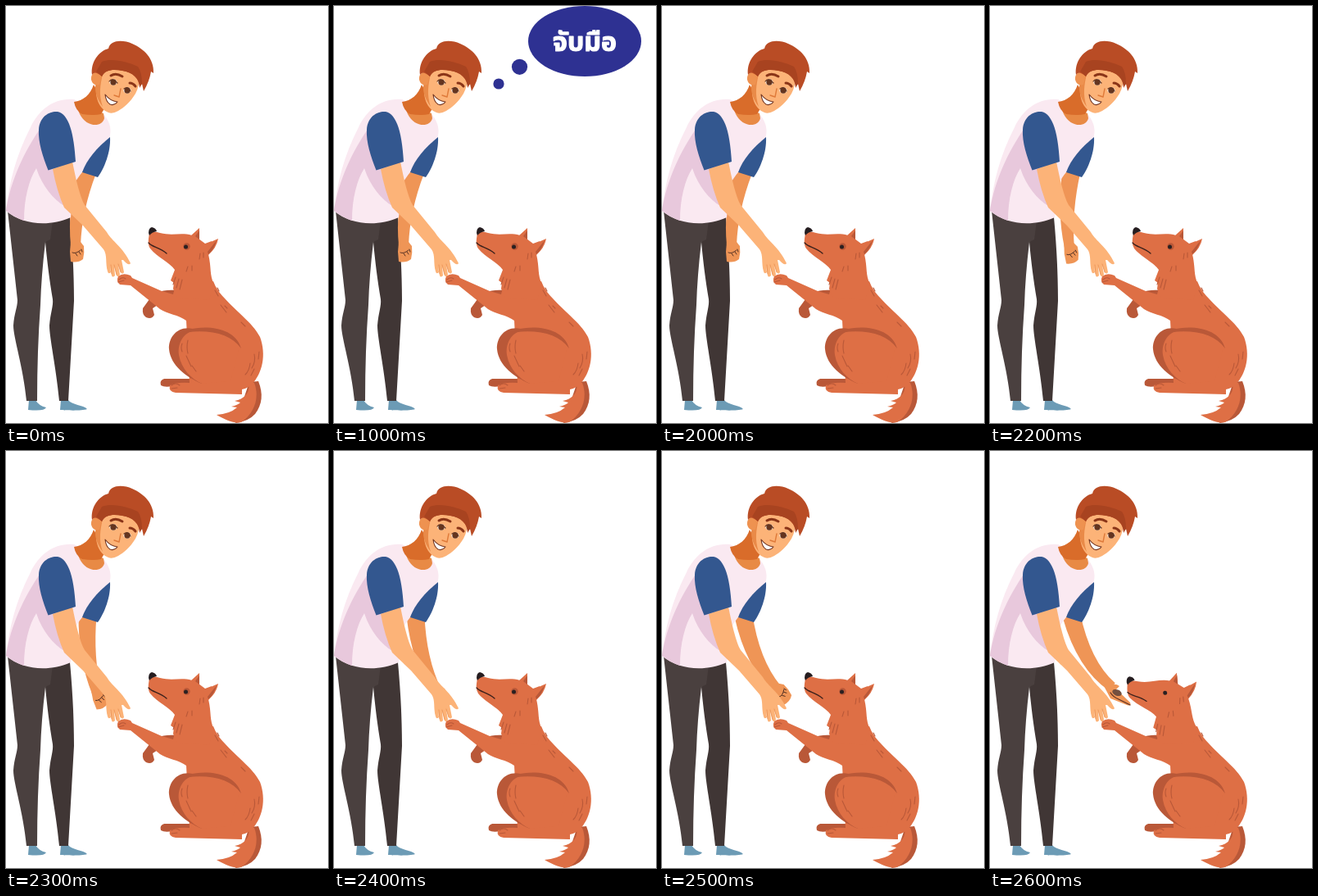
Animation of 393 by 509 pixels, one loop 4.6 s. Source, as an HTML page:

```html
<!DOCTYPE html>
<html lang="th">
<head>
<meta charset="utf-8">
<style>
html, body { margin: 0; width: 100%; height: 100%; overflow: hidden; background: #fff; }
svg { display: block; width: 100%; height: 100%; }
.line { fill: none; stroke-linecap: round; stroke-linejoin: round; }
.fur { fill: none; stroke: #b95838; stroke-width: 1.1; stroke-linecap: round; }
text { font: 700 32px "Noto Sans Thai Looped", "Noto Sans Thai", "Noto Sans", sans-serif; }
</style>
</head>
<body>
<svg viewBox="0 0 393 509">
  <g id="bubble" fill="#2e3192">
    <ellipse cx="306" cy="43" rx="69" ry="43"/>
    <circle cx="226.500" cy="74.300" r="9.600"/>
    <circle cx="201" cy="95" r="6.600"/>
    <text x="306" y="55" text-anchor="middle" fill="#fff" stroke="#fff" stroke-width="1.200" stroke-linejoin="round">จับมือ</text>
  </g>

  <g id="legs">
    <path fill="#6c9bb5" d="M28 481H36Q40 488 49 490Q47 495 27 493ZM67 481H76C80 487 95 487 99 492C92 494.500 72 493.500 66 493Z"/>
    <path fill="#403635" d="M54 262L78 258C81 290 83 325 83 360L76 482H65C61 440 53 405 53 390C54 375 58 366 57 358C53 335 50 310 48 288Z"/>
    <path fill="#4a403f" d="M2 250L57 262L54 285L48 288Q43 330 42 365Q38 420 38 482H25C21 440 9 405 9 390C10 375 14 368 14 359Z"/>
  </g>

  <path id="farArm" fill="#ef9556"/>
  <g id="fist">
    <path fill="#ef9556" d="M-6 -4H6L10 1Q11 9 9 17Q3 22 -6 20L-7 8Z"/>
    <path class="line" stroke="#4a2a20" stroke-width=".9" d="M-4 9Q0 11 6 6M0 10L2 13M4 8L6 11M7 5L8 8"/>
  </g>
  <g id="palm">
    <path fill="#ef9556" d="M138 285L147 286Q153 283 158 287L154 291Q163 299 171 307Q173 312 167 310L147 302Z"/>
    <path class="line" stroke="#5a3022" stroke-width="1.200" d="M147 295Q150 300 157 303L171 310"/>
    <ellipse cx="155" cy="295" rx="6" ry="3.700" transform="rotate(22 155 295)" fill="#74503f"/>
  </g>

  <g id="torso">
    <path fill="#fae9f1" d="M83 114C58 112 40 127 30 148C12 183 4 215 0 250C20 267 52 270 79 258L83 218C94 196 126 172 127 158C129 147 125 140 120 133Z"/>
    <path fill="#e8c8dc" d="M40 152C16 188 4 222 0 250Q10 258 22 262C22 235 28 212 37 198C44 220 58 236 71 244L66 195Z"/>
    <path fill="#e88a45" d="M84 117L119 131L120 137C117 149 98 148 90 132Z"/>
    <path fill="#d96c2a" d="M107 96C103 108 94 116 83 117Q85 128 93 132Q107 134 116 132L122 122Z"/>
    <path fill="#33578f" d="M127 160C128 178 120 198 112 209L93 203C98 188 111 173 127 160Z"/>
    <path fill="#fcb378" d="M57 199L81 190C85 210 90 233 96 243L123 276C130 288 142 293 152 314Q150 318 143 310L141 310L144 325Q142 328 140 325L137 316L139 328Q137 332 135 329L132 317L133 329Q130 332 129 329L127 316L128 325Q125 328 124 324C121 314 124 304 119 297L94 268L71 246Q62 226 57 199Z"/>
    <path class="line" stroke="#e78f52" stroke-width=".8" d="M128 316L129 327M132 316L135 328M137 315L140 325"/>
    <path fill="#33578f" d="M40 151C41 134 54 128 63 129C77 132 83 156 85 190L51.500 200.500C45 184 39 166 40 151Z"/>
  </g>

  <g id="head">
    <path fill="#fcb378" d="M113 76Q140 66 163 86Q163 98 158 107C152 117 144 124 137 128Q130 132 125 130C114 126 107 111 111 92Z"/>
    <path fill="#e98a48" d="M113 76L118 83C115 96 113 108 118 123Q106 107 110 92Z"/>
    <path fill="#ee9250" d="M117 84C110 77 103 82 104 90Q106 98 114 96Z"/>
    <path fill="#b94c25" d="M105 84C103 69 113 55 125 52C127 41 143 41 154 46C168 52 181 64 180 82L177 80Q175 92 168 104L166 95L163 100C163 89 155 81 142 79C130 77 121 78 117 86Q108 78 105 84Z"/>
    <path fill="#a84320" d="M117 68C130 63 150 69 161 74Q166 81 166 95L163 98C162 88 155 81 142 79C130 77 121 78 117 86Q111 80 110 80Z"/>
    <path class="line" stroke="#8a3518" stroke-width="3" d="M128 85Q134 81 142 86M151 94Q155 94 158 98"/>
    <g fill="#fff"><ellipse cx="131" cy="93" rx="4.600" ry="3.700"/><ellipse cx="148" cy="103" rx="4.600" ry="3.700"/></g>
    <g fill="#65351f"><circle cx="131" cy="93" r="3.700"/><circle cx="148" cy="103" r="3.700"/></g>
    <path class="line" stroke="#65351f" stroke-width="1.200" d="M126 92Q130 87 136 94M144 101Q149 97 152 104"/>
    <path class="line" stroke="#df7a3a" stroke-width="1.400" d="M140 101L138 111L132 109"/>
    <path fill="#fff" stroke="#743520" stroke-width="1.100" stroke-linejoin="round" d="M121 108Q127 116 136 117Q132 122 127 120Q122 117 121 108Z"/>
  </g>

  <g id="dog" fill="#de6f45">
    <path fill="#b95838" d="M207 347C191 346 181 349 175 358L167 369Q166 377 171 380Q178 383 181 377L179 369L188 363L211 356ZM240 455H193Q187 457 189 463Q193 466 204 464L242 463Z"/>
    <path fill="#b95838" d="M297 459L308 458C314 473 313 486 304 498Q296 507 280 509Z"/>
    <path d="M296 460L303 460C310 478 303 498 287 508C276 510 266 504 257 499Q273 498 282 490L275 489Q283 487 286 484L279 482C293 479 298 470 296 460Z"/>
    <path d="M207 340L253 336Q255 342 260 349C280 373 301 386 310 404C318 426 313 448 300 462Q296 466 288 468V474L207 472Q198 471 200 463Q207 459 224 460L220 384C211 377 197 376 188 370L152 341L139 340Q134 336 137 330Q143 325 152 329L154 332L190 348L204 352Z"/>
    <path fill="#b95838" d="M228 394C209 390 198 405 199 419C201 439 220 453 239 461L250 453L222 418Z"/>
    <path d="M234 396C218 396 209 410 211 426C214 443 226 455 239 461L274 458L285 416Q256 392 234 396Z"/>
    <path fill="#b95838" d="M222 395C247 389 280 393 287 418C275 401 252 395 222 398Z"/>
    <path class="fur" d="M138 334Q142 330 146 333M137 337L144 335M202 463Q207 459 212 463M202 467L209 466M255 347L259 354M258 344L260 348M262 365L269 374M267 366L270 369M287 386L292 391M215 412Q213 417 215 422M222 408Q220 416 222 424M220 427L226 440M227 439L232 446M303 425Q305 434 300 442M309 422L308 431M298 436Q297 445 292 450M303 443L299 451"/>
    <g id="dogHead">
      <path d="M175 277Q180 274 188 277C203 281 214 276 227 280L235 273L235 284L243 290L251 287Q249 298 247 303C251 320 248 328 254 340L248 359L208 356L204 345L205 338L201 335L206 322C200 313 185 307 176 296Q173 292 174 284Z"/>
      <path d="M226 280L236 271L236 285ZM243 291L259 284Q257 295 247 304Z"/>
      <path fill="#b95838" d="M231 281L236 274L236 285ZM246 300L257 286Q254 297 247 303Z"/>
      <path fill="#251d20" d="M174 277Q174 271 178 270Q183 271 184 275Q178 276 175 280Z"/>
      <path class="line" stroke="#3b211c" stroke-width="1.300" d="M174 289C179 295 187 294 196 302"/>
      <circle id="eyeRing" cx="220.500" cy="293.500" r="4.200" fill="#b95838"/>
      <circle cx="219.500" cy="294" r="2.500" fill="#2a2021"/>
      <path class="fur" d="M222 318L220 324M227 317L227 323M237 302L236 309M241 301L241 307M211 333L208 344M215 334L212 346M207 331L204 340"/>
    </g>
  </g>
</svg>
<script>
const LOOP = 4600;
const $ = id => document.getElementById(id);
const show = (id, on) => $(id).style.display = on ? "" : "none";

// Tapered outline through shoulder, elbow and wrist.
function limb(points, halfWidths, normals) {
  const side = sign => points.map(([x, y], i) =>
    [x + sign * halfWidths[i] * Math.cos(normals[i]), y - sign * halfWidths[i] * Math.sin(normals[i])]);
  const bend = ([from, mid, to]) => mid.map((v, i) => v * 1.2 - (from[i] + to[i]) * .1);
  const right = side(1), left = side(-1).reverse();
  return `M${right[0]}Q${bend(right)} ${right[2]}L${left[0]}Q${bend(left)} ${left[2]}Z`;
}

function draw(t) {
  show("bubble", t >= 1000 && t < 2000);

  const step = Math.max(0, Math.min(5, Math.floor((t - 2100) / 100)));
  const feeding = step === 5;
  const reach = feeding ? 1.15 : step / 4;
  const angle = 40 * reach ** 1.3;
  const rad = angle * Math.PI / 180;
  const shoulder = [99.5, 201];
  const elbow = [85 + 27 * reach, 248 + 9 * reach];
  const wrist = [elbow[0] + 44 * Math.sin(rad), elbow[1] + 44 * Math.cos(rad)];
  const upper = Math.atan2(elbow[0] - shoulder[0], elbow[1] - shoulder[1]);

  $("farArm").setAttribute("d", limb([shoulder, elbow, wrist], [11, 9, 6], [upper, (upper + rad) / 2, rad]));
  $("fist").setAttribute("transform", `translate(${wrist}) rotate(${-angle})`);
  show("fist", !feeding);
  show("palm", feeding);
  show("eyeRing", !feeding);
  $("dogHead").setAttribute("transform", feeding ? "rotate(-5.5 229 355)" : "");
}

const start = performance.now();
function tick() {
  draw((performance.now() - start) % LOOP);
  requestAnimationFrame(tick);
}
tick();
</script>
</body>
</html>
```
